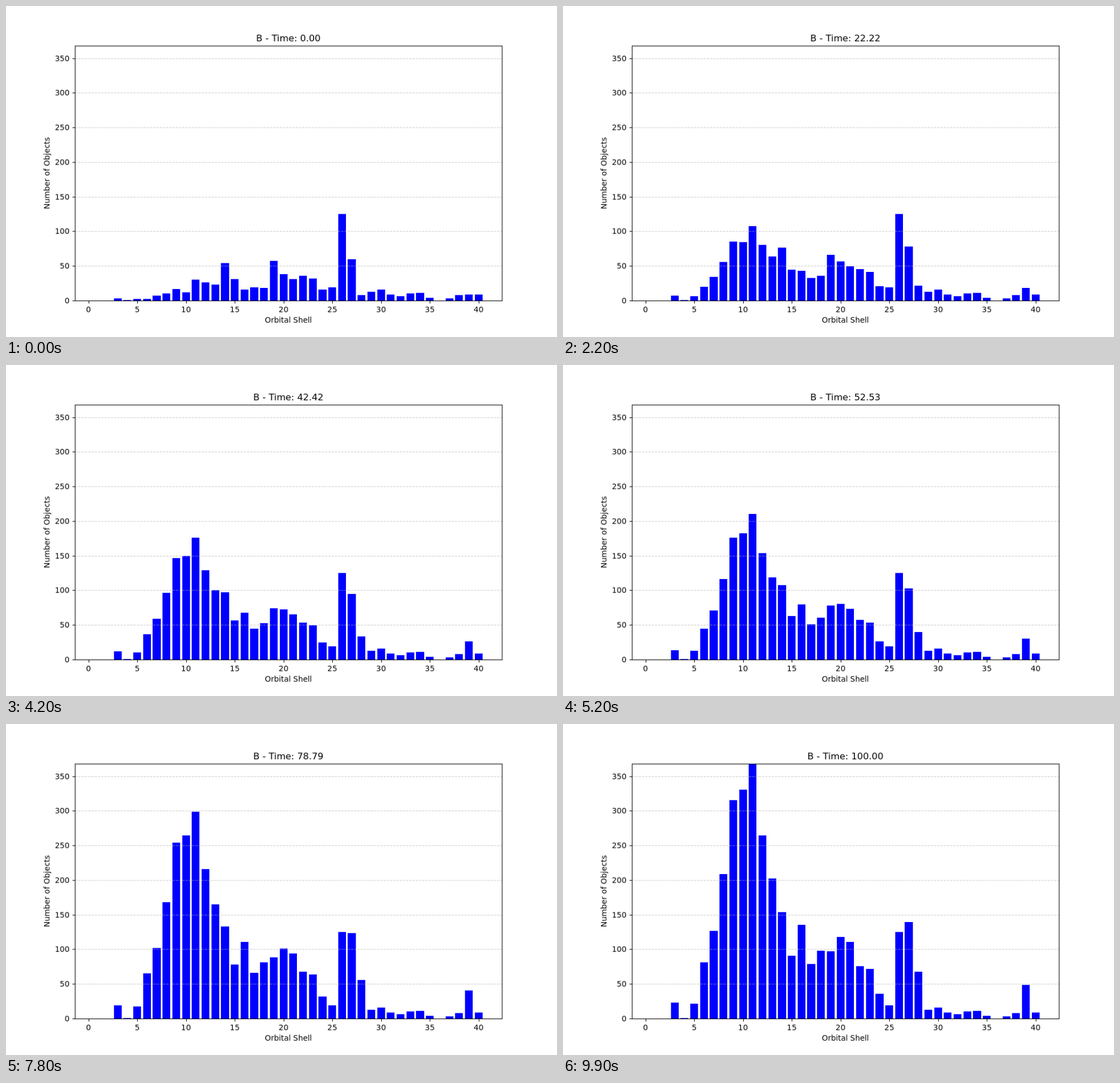
These frames come from a looping animation (966 px wide and 580 px high, 10000 ms). An HTML page with a canvas:

```html
<!DOCTYPE html>
<html lang="en">
<head>
<meta charset="utf-8">
<title>Objects per orbital shell</title>
<style>
html, body { margin: 0; width: 100%; height: 100%; overflow: hidden; background: #fff; }
canvas { display: block; }
</style>
</head>
<body>
<canvas id="stage" width="966" height="580"></canvas>
<script>
const STEPS = 100, STEP_MS = 100;
const stage = document.getElementById("stage");
const view = stage.getContext("2d");

// The chart is drawn on a 1000 x 600 sheet and scaled to the stage
const sheet = document.createElement("canvas");
const W = sheet.width = 1000, H = sheet.height = 600;
const ctx = sheet.getContext("2d");

const PT = 100 / 72;
const left = W * 0.125, right = W * 0.9, ceiling = H * 0.12, base = H * 0.89;
const midX = (left + right) / 2, midY = (ceiling + base) / 2;
const xMin = -1.39, xMax = 42.39, yMax = 368;

// Objects at the start, shells 1 to 40
const initial = [
  0, 0, 3, 1, 2, 2, 7, 10, 17, 12, 30, 26, 23, 54, 31, 16, 19, 18, 57, 38,
  31, 36, 32, 16, 19, 125, 60, 8, 13, 16, 9, 6, 10, 11, 4, 0, 3, 8, 9, 9
];
// Launches per five time units, from shell 3 on
const firstShell = 3;
const launches = [
  1, 0, 1, 4, 6, 10, 15, 16, 17, 12, 9, 5, 3,
  6, 3, 4, 2, 4, 4, 2, 2, 1, 0, 0, 4, 3
];
launches[39 - firstShell] = 2;

// Growth slows a little over the run
function objects(shell, s) {
  const rate = launches[shell - firstShell] || 0;
  return initial[shell - 1] + 20 * rate * s * (1.03 - 0.035 * s);
}

const xPos = v => left + (v - xMin) / (xMax - xMin) * (right - left);
const yPos = v => base - v / yMax * (base - ceiling);
const snap = v => Math.round(v) + 0.5;

function line(x1, y1, x2, y2) {
  ctx.beginPath();
  ctx.moveTo(x1, y1);
  ctx.lineTo(x2, y2);
  ctx.stroke();
}

function label(text, x, y, align = "center", size = 10) {
  ctx.font = `${size * PT}px "DejaVu Sans", sans-serif`;
  ctx.textAlign = align;
  ctx.fillText(text, x, y);
}

function drawBars(s) {
  ctx.fillStyle = "#00f";
  for (let shell = 1; shell <= initial.length; shell++) {
    const x1 = Math.round(xPos(shell - 0.4)), x2 = Math.round(xPos(shell + 0.4));
    const y = Math.round(yPos(objects(shell, s)));
    ctx.fillRect(x1, y, x2 - x1, base - y);
  }
}

function drawAxes() {
  const l = snap(left), r = snap(right), t = snap(ceiling), b = snap(base);
  const lw = 0.8 * PT, tick = 3.5 * PT;
  ctx.lineWidth = lw;

  ctx.strokeStyle = "rgba(176,176,176,0.7)";
  ctx.setLineDash([3.7 * lw, 1.6 * lw]);
  for (let v = 0; v <= 350; v += 50) line(l, snap(yPos(v)), r, snap(yPos(v)));
  ctx.setLineDash([]);

  ctx.strokeStyle = ctx.fillStyle = "#000";
  for (let v = 0; v <= 350; v += 50) {
    const y = snap(yPos(v));
    line(l - tick, y, l, y);
    label(v, left - 2 * tick, Math.round(yPos(v)) + 5, "right");
  }
  for (let v = 0; v <= 40; v += 5) {
    const x = snap(xPos(v));
    line(x, b, x, b + tick);
    label(v, xPos(v), 555);
  }
  ctx.strokeRect(l, t, r - l, b - t);
}

function drawLabels(s) {
  label("B - Time: " + (100 * s).toFixed(2), midX, 64, "center", 12);
  label("Orbital Shell", midX, 574);
  ctx.save();
  ctx.translate(79, midY);
  ctx.rotate(-Math.PI / 2);
  label("Number of Objects", 0, 0);
  ctx.restore();
}

function draw(n) {
  const s = n / (STEPS - 1);
  ctx.fillStyle = "#fff";
  ctx.fillRect(0, 0, W, H);
  drawBars(s);
  drawAxes();
  drawLabels(s);
  view.imageSmoothingQuality = "high";
  view.drawImage(sheet, 0, 0, stage.width, stage.height);
}

const start = performance.now();
let shown = -1;
function loop(now) {
  const n = Math.floor(Math.max(0, now - start) / STEP_MS) % STEPS;
  if (n !== shown) draw(shown = n);
  requestAnimationFrame(loop);
}
draw(0);
requestAnimationFrame(loop);
</script>
</body>
</html>
```
